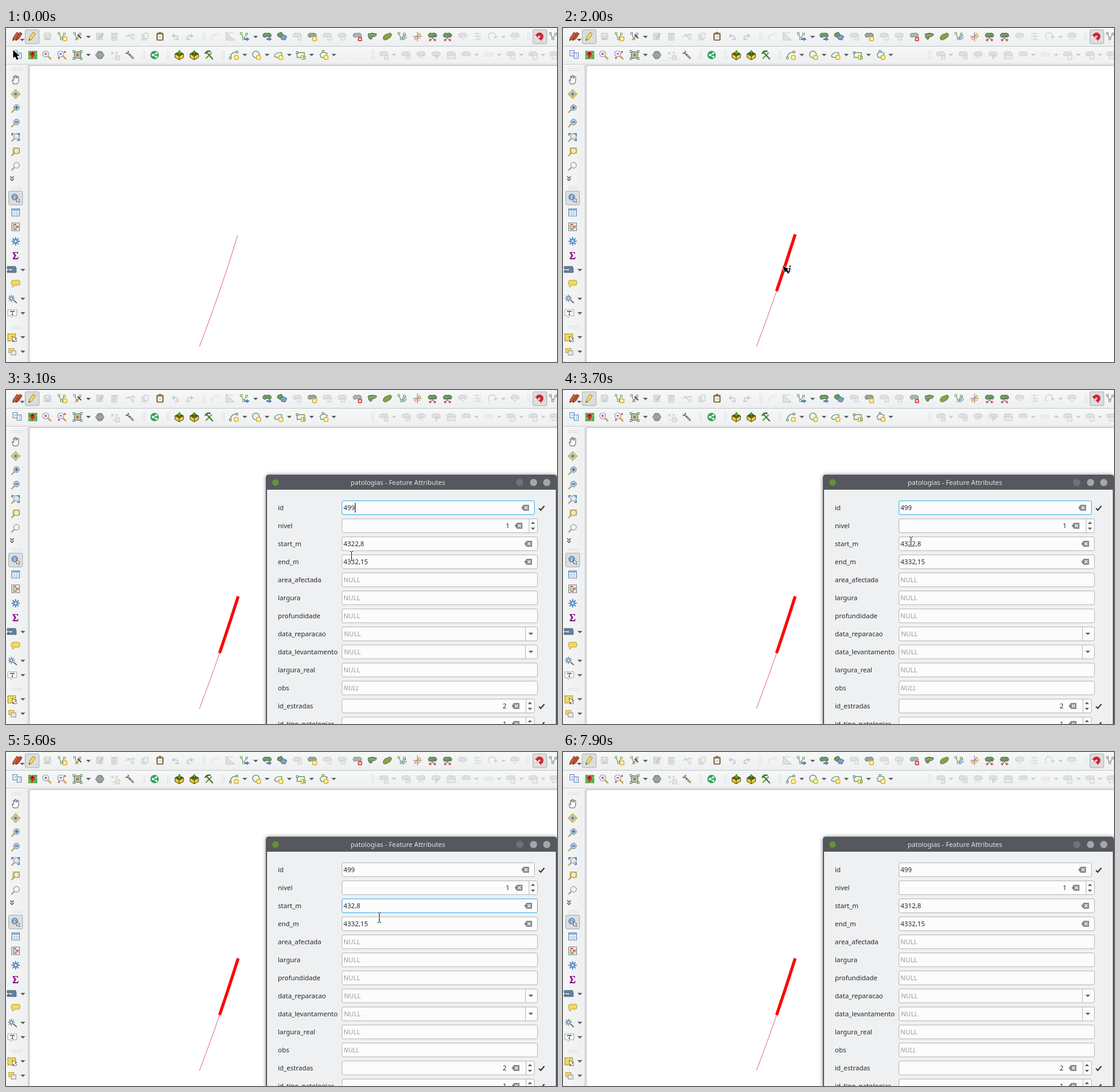
Recreate the animation shown at these times as an HTML page. Size 916 by 556 pixels, loop 8 s.

```html
<!DOCTYPE html>
<html lang="pt">
<head>
<meta charset="utf-8">
<title>Feature attributes</title>
<style>
  html, body { margin: 0; height: 100%; overflow: hidden; background: #fff; }
  svg { display: block; }
  text { font: 11px "Noto Sans", sans-serif; fill: #26292c; white-space: pre; }
  .null { fill: #9a9c9e; }
  .italic { font-style: italic; }
  .shadow { filter: drop-shadow(0 0 3px #0007); }
</style>
</head>
<body>
<svg id="stage" width="916" height="556" viewBox="0 0 916 556"></svg>
<script>
const GREEN = '#6f9c62', DARK = '#46664a', GREY = '#cacccd', PALE = '#dfe0e1',
  BLUE = '#5585b8', YELLOW = '#f4da58', INK = '#4a4e51', RED = '#d8232d';

// Drawing helpers, all returning SVG markup
const path = (d, fill = 'none', stroke = 'none', w = 1) =>
  `<path d="${d}" fill="${fill}" stroke="${stroke}" stroke-width="${w}"/>`;
const line = (d, stroke, w = 1) => path(d, 'none', stroke, w);
const rect = (x, y, w, h, fill, stroke = 'none', r = 0) =>
  `<rect x="${x}" y="${y}" width="${w}" height="${h}" rx="${r}" fill="${fill}" stroke="${stroke}"/>`;
const circle = (x, y, r, fill, stroke = 'none', w = 1) =>
  `<circle cx="${x}" cy="${y}" r="${r}" fill="${fill}" stroke="${stroke}" stroke-width="${w}"/>`;
const text = (x, y, s, attrs = '') => `<text x="${x}" y="${y}" ${attrs}>${s}</text>`;
const at = (x, y, art) => `<g transform="translate(${x} ${y})">${art}</g>`;

const drop = (x, y, c = '#5a5e61') => path(`M${x - 4} ${y - 2}h8l-4 4z`, c);
const dots = d => `<path d="${d}" stroke="#b4b7b9" stroke-dasharray="1 2" fill="none"/>`;
const gripV = (x, y) => dots(`M${x - 1.5} ${y - 7}v15m3-15v15`);
const gripH = y => dots(`M9 ${y - 1.5}h16m-16 3h16`);
const pressed = (x, y) => rect(x - 11.5, y - 11.5, 23, 23, '#dcdddf', '#a9acae', 2);

// Icon parts
const node = (x, y, c = '#5d7f61') => rect(x - 1.5, y - 1.5, 3, 3, '#fff', c);
const star = rect(0.5, 0.5, 7, 7, YELLOW, '#c9ab3a', 1) + line('M4 2v4M2 4h4', '#fff', 1.5);
const arrow = path('M-1 3h4v-2l5 3.5-5 3.5v-2h-4z', BLUE);
const vee = (c = GREEN) => line('M-6-5l4 9 5-8', c, 1.2) + node(-6, -5, c) + node(-2, 4, c) + node(3, -4, c);
const blob = (fill, edge) => path('M-7-3Q-5-7-1-5Q6-7 7-2Q7 2 3 1Q0-1-2 1Q-7 3-7-3z', fill, edge);
const greyBlob = blob(PALE, GREY);
const greenBlob = blob(GREEN, DARK);
const pencil = (fill, edge) => path('M-5 7l1-5 6-9 4 2.500-6 9z', fill, edge) + path('M-5 7l.5-2.500 2 1z', '#333');
const lens = (fill, sign = '') => line('M-2 2l-5 5', '#b39a4c', 2) +
  circle(1.5, -1.5, 4.7, fill, '#737b80') + line(sign, '#2e5d8f', 1.6);
const redLens = extra => line('M2 2l5 5', '#c8a23c', 2.5) + circle(-2, -2, 5, '#f4f8fb', '#7f9fbd', 1.2) + extra;
const gear = c => line('M0-7V7M-7 0H7M-5-5L5 5M5-5L-5 5', c, 2) + circle(0, 0, 4.2, c) + circle(0, 0, 1.8, '#eff3f7');
const sheet = (x, y, fill, edge) => rect(x, y, 7, 9, fill, edge);
const box = path('M-7-2L0-6 7-2V4L0 8-7 4z', '#f0d22f', '#3a3818') + path('M-6-2L0-5 6-2 0 1z', '#4b4a1b') +
  line('M-7-2L0 2 7-2M0 2V8', '#3a3818');
const split = greenBlob + line('M-4 7L4-2M4 7L-2 0', '#4b4e50') + circle(-4, 6, 1.5, 'none', RED) + circle(4, 6, 1.5, 'none', RED);

const row1 = {
  18: at(-2, 0, pencil('#c0623a', '#8a4024')) + at(3, 0, pencil('#b9502d', '#8a4024')) + drop(9, 6),
  69: rect(-5.5, -5.5, 11, 11, PALE, GREY, 1) + rect(-3, -5, 6, 4, '#f2f2f2', GREY) + rect(-3, 2, 6, 3, GREY),
  94: vee() + star,
  120: vee('#84898b') + line('M-5 6L4-3', '#c59636', 1.6) + line('M-1-3l6 6', INK, 2) + drop(17, 1),
  156: rect(-5.5, -5.5, 10, 11, PALE, GREY) + line('M-4-2h7M-4 1h5', GREY) + line('M-1 4l7-9', '#b9bbbc', 2),
  180: rect(-4.5, -3.5, 9, 10, PALE, GREY, 1) + line('M-6-5h12M-2-1v5M1-1v5', GREY, 1.3),
  206: line('M-7 0L6-4M-4-4l8 8', GREY, 1.4) + circle(5, 4, 2, 'none', GREY) + circle(6, -2, 2, 'none', GREY),
  231: sheet(-5, -3, PALE, GREY) + sheet(-1.5, -5.5, '#eee', GREY),
  256: rect(-5.5, -5.5, 11, 12, '#a0805a', '#7f6338', 1) + rect(-3.5, -3, 7, 8, '#fbfbf6') + line('M-2-6h4', '#777', 3) + line('M-2 0h4M-2 2h4', '#b5b5ae'),
  281: line('M-4-1H1Q5-1 5 5H0', GREY, 2) + path('M-6-1l5-4v8z', GREY),
  306: line('M4-1H-1Q-5-1-5 5H0', GREY, 2) + path('M6-1l-5-4v8z', GREY),
  347: line('M-6 6Q-5-5 6-4', PALE, 1.5) + node(6, -4, PALE),
  372: path('M-6-6V6H7z', '#e6e7e7', GREY, 1.4) + line('M-6-6L6-6M-3 0v3h3', GREY),
  397: vee() + arrow + drop(18, 1),
  434: greenBlob + arrow,
  459: path('M-7-5l6-2 3 5-5 4-5-3z', GREEN, DARK) + path('M-3 0l5-3 6 3-3 6-6-1z', '#7ba3c1', '#47718f'),
  484: greyBlob + rect(1, 0, 6, 6, '#eceded', GREY),
  509: blob('#9ba599', '#737d72') + star,
  534: greyBlob + rect(1, 0, 6, 6, '#eceded', GREY),
  559: greyBlob + rect(-2, 1, 6, 5, '#eceded', GREY),
  584: blob('#aeb4b0', '#858c88') + rect(1, 1, 7, 7, '#dc4a50', 'none', 1) + line('M3 3l3 3M6 3l-3 3', '#fff', 1.2),
  609: path('M-7-4Q0-7 7-4Q7 1 1 0Q-1 5-3 5Q-7 3-7-4z', GREEN, DARK) + line('M-6-1Q0-4 6-1', '#d9b744', 1.2),
  634: path('M-7 4Q-7-3 0-4Q7-8 7-2Q5 3 1 4Q-5 8-7 4z', '#85a348', '#5d7531'),
  659: vee() + line('M-1 5l7-8M1 6l6-5', BLUE, 1.2),
  684: line('M-7 0H7M0-8V8', '#777') + line('M-4 6L4-6M-6 3H5', '#e06a58') + node(4, -2, '#dca52e') + node(-2, 3, '#dca52e'),
  709: split, 734: split,
  759: greyBlob + line('M-3 2l6 3', GREY),
  784: line('M-6-5H6M-6 0H6M-6 5H6', PALE, 2) + line('M-2-6l4 12', GREY),
  809: line('M-4 5A6 6 0 1 1 5 1', GREY, 1.3) + path('M2 0h6l-3 4z', GREY) + drop(18, 1, GREY),
  846: greyBlob + line('M-3 4h6', GREY),
  911: vee('#84898b')
};

const shape = (d, dd) => line(d, GREEN, 1.4) + star + drop(dd, 0);
const row2 = {
  18: sheet(-6.5, -7.5, '#f2f6fa', BLUE) + sheet(.5, -3.5, '#f2f6fa', BLUE) + line('M-4-4h3M-4-2h3M3-1h3M3 2h3', '#86a9cf'),
  44: rect(-7, -7, 15, 14, '#5fae4c') + line('M-7 3L8-3M-2-7L3 7', '#a4d394') + path('M0 6L-4-1A4 4 0 1 1 4-1z', RED) + circle(0, -3, 1.4, '#5a0d11'),
  68: redLens(circle(-2, -2, 2, '#dc555c')),
  93: redLens(line('M-4-2h4', RED, 1.6) + circle(5, -5, 1.4, RED) + circle(-5, 5, 1.4, RED)),
  119: rect(-5.5, -5.5, 11, 11, '#a7c99d', '#667f67') + node(-6, -6) + node(6, -6) + node(-6, 6) + node(6, 6) + circle(0, 0, 2.2, '#da5a4a') + drop(18, 0),
  156: path('M-7 0L-3-6H3L7 0 3 6H-3z', '#d3d6d8', '#5e6366') + line('M-7 0H7M-5-3H5M-5 3H5M0-6V6M-2-6Q-5 0-2 6M2-6Q5 0 2 6', '#5e6366', .8),
  181: line('M-6-5l4 4m0-4l-4 4M1-5l2 2 2-2m-2 2v3', GREY, 1.3) + rect(1, 1, 7, 7, '#ebe5cb', GREY) + line('M-5 5H0', GREY),
  206: line('M-2-2L6 6', '#63676a', 3) + line('M-3-7Q-1-2-7-3', '#63676a', 2) + line('M0 0L6 6', '#d7b25a', 1.3),
  247: circle(0, 0, 7, '#35a45a') + line('M3-3L-3 0l6 3', '#fff', 1.2) + circle(3, -3, 1.7, '#fff') + circle(-3, 0, 1.7, '#fff') + circle(3, 3, 1.7, '#fff'),
  288: box + path('M-3-5h2v-3h3v3h2L0 0z', '#55a52f'),
  313: box + path('M-3-4l3-4 3 4H1v4h-2v-4z', '#55a52f', '#2f6420', .7),
  338: line('M-6 6L4-4', '#5fae39', 2.4) + line('M-5-5L6 7', '#4f6a48', 2) + line('M-7-2Q-4-8 2-6', '#3c7433', 2.6),
  379: shape('M-6 5Q-6-5 5-5', 18) + node(-6, 5) + node(5, -5),
  416: shape('M-6-1A5.500 5.500 0 1 1 5-1A5.500 5.500 0 1 1-6-1', 18),
  453: shape('M-7 2Q-5-5 4-4Q8-3 3 2Q-3 6-7 2', 18),
  490: shape('M-6-4H6V4H-6z', 18) + node(-6, -4) + node(6, 4),
  528: shape('M-6-1L-1-6 6-3 3 4-4 4z', 17) + node(-1, -6),
  628: greyBlob + rect(1, 1, 6, 6, '#e8e9e9', GREY) + drop(17, 0, GREY),
  665: greyBlob + rect(0, 1, 7, 5, '#e8e9e9', GREY),
  690: greyBlob + line('M-5 6l10-7M-3 0l7 6', GREY),
  715: greyBlob + line('M0-1v8M3 0v4', GREY, 2),
  740: greyBlob + rect(-6, 0, 13, 6, '#e8e9e9', GREY),
  765: greyBlob + drop(17, 0, GREY),
  802: path('M-7-3H7L6 2H-5z', '#ececec', PALE) + drop(18, 0, GREY),
  839: greyBlob + rect(0, 0, 7, 7, '#eee', GREY) + drop(18, 0, GREY),
  876: greyBlob + rect(0, 0, 7, 7, '#eee', GREY) + drop(17, 0, GREY),
  911: greyBlob + rect(-3, 0, 8, 6, '#eee', GREY)
};

const side = {
  86: path('M-4 7L-6 1-5 0-3 2-4-5-2-6-1-2-1-7 1-7 2-2 3-6 5-5 5 3 3 7z', '#fff', '#55585a'),
  110: path('M0-8l3.500 4h-7zM0 8l3.500-4h-7zM-8 0l4-3.500v7zM8 0l-4-3.500v7z', '#efcf48', '#a08a2c', .7) + rect(-2.5, -2.5, 5, 5, BLUE),
  134: lens('#b4cde4', 'M-1 -1.500h5m-2.500-2.500v5'),
  158: lens('#b4cde4', 'M-1-1.500h5'),
  182: lens('#dfe8f0') + path('M-7-7h5l-5 5zM7-7v5l-5-5zM7 6v-5l-5 5z', BLUE),
  206: rect(-4.5, -6.5, 11, 9, YELLOW, '#c9b35a') + lens('#f7ecb0'),
  230: lens('#f5f6f4'),
  251: line('M-9-4l3 3 3-3m-6 4l3 3 3-3', INK, 1.4),
  283: pressed(0, 0) + circle(-1.5, -1.5, 5, '#7ba2ca', '#5580ab') + line('M-1.500-1.500v3M-1.500-4.500v1.500', '#fff', 1.5) + path('M1 0l6 3-2 1 2 3-1 1-3-3-1 2z', '#fff', '#444', .8),
  307: rect(-6.5, -6, 13, 12, '#f7fafc', BLUE) + rect(-6, -6, 12, 3, '#83abd4') + line('M-6 0H6M-6 3H6M-2-3V6M2-3V6', '#a9c3de'),
  331: rect(-6.5, -6.5, 13, 13, '#f4f4f2', '#7b7f82') + line('M-6-2H6M-6 2H6', '#999') + line('M-4-4h5M0 0h5', '#cc6058', 2) + line('M-4 0h2M-4 4h6', '#6aa765', 2),
  355: gear('#5b92c9'),
  379: path('M-5-6H4V-3H3L2-5H-2L1 0-2 4H3L4 2H5L4 6H-5V5L-2 0-5-5z', '#8b128f'),
  402: path('M-14-1V-5H-2Q1-6 1 0V5H-14V2H-5V-1z', '#6483a3', '#47607a') + line('M-12 0V4', INK) + drop(12, 1),
  426: path('M-4-6H5Q7-6 7-3V0Q7 2 5 2H-1L-5 6V2Q-7 2-7 0V-3Q-7-6-4-6z', YELLOW, '#b89e42'),
  451: at(-7, -1, `<g transform="scale(.85)">${gear('#7f99b1')}</g>`) + line('M-3 2L2 7', INK, 1.5) + drop(12, 0),
  475: path('M-13-6H2V4H-4L-7 7-8 4H-13z', '#fafafa', '#a3a7a9') + path('M-9-4H-2V-2H-3L-4-3H-5V2H-4V3H-7V2H-6V-3H-7L-8-2H-9z', '#444') + drop(12, 0),
  515: `<rect x="-13" y="-6" width="13" height="12" fill="${YELLOW}" stroke="#6b6136" stroke-dasharray="2 1"/>` + path('M-6-2l8 4-3 1 3 3-2 2-3-3-1 3z', '#fff', '#444', .8) + drop(12, 0),
  539: rect(-11.5, -5.5, 9, 7, YELLOW, '#b8a24b') + rect(-7.5, -1.5, 8, 7, '#e4e6e8', '#92989b') + drop(12, 0)
};

const place = (icons, y) => Object.entries(icons).map(([x, art]) => at(x, y, art)).join('');
const magnet = `<g transform="rotate(225)">${line('M-4-5V0A4 4 0 0 0 4 0V-5', RED, 5) + line('M-4-6v2.500M4-6v2.500', '#f4f4f4', 4)}</g>`;

const toolbars = `<defs>
  <linearGradient id="down" x2="0" y2="1"><stop stop-color="#f6f7f7"/><stop offset="1" stop-color="#eeeff0"/></linearGradient>
  <linearGradient id="across"><stop stop-color="#f4f5f5"/><stop offset="1" stop-color="#eeeff0"/></linearGradient></defs>` +
  rect(0, 0, 916, 30, 'url(#down)') + rect(0, 31, 916, 30, 'url(#down)') + rect(0, 62, 37, 494, 'url(#across)') +
  line('M0 30.500H916M0 60.500H916M36.500 62V556', '#c3c6c8') + line('M38.500 556V62.500H916', '#a6a9ab') +
  pressed(43.5, 14.5) + at(43, 14, pencil(YELLOW, '#9a8838')) + place(row1, 14) +
  pressed(887.5, 14.5) + at(887, 14, magnet) + place(row2, 45) +
  [[329, 14], [869, 14], [229, 45], [270, 45], [361, 45], [610, 45]].map(p => gripV(...p)).join('') +
  Object.entries(side).map(([y, art]) => at(16, y, art)).join('') + [69, 266, 498].map(gripH).join('');

// Attribute form
const rows = [
  ['id', '499', 'clear check'], ['nivel', '1', 'spin'], ['start_m', '4322,8', 'clear'], ['end_m', '4332,15', 'clear'],
  ['area_afectada'], ['largura'], ['profundidade'], ['data_reparacao', 'NULL', 'combo'], ['data_levantamento', 'NULL', 'combo'],
  ['largura_real'], ['obs', 'NULL', 'italic'], ['id_estradas', '2', 'spin check'], ['id_tipo_patologias', '1', 'spin check']
];
const clearIcon = (x, y) => at(x, y, path('M-6.500 0l4-5h9v10h-9z', '#85888a') + line('M-1-2.500l5 5m0-5l-5 5', '#fff', 1.3));

function formRow([label, value = 'NULL', kind = ''], i) {
  const y = 196 + 30 * i, has = k => kind.includes(k), right = has('check') ? 878 : 883;
  let out = text(452, y + 4, label) +
    `<g id="field${i}">${rect(558.5, y - 11.5, right - 558, 23, '#fcfcfc', '#b5b8ba', 2.5)}</g>`;
  if (has('spin')) {
    const x = right - 7;
    out += text(right - 46, y + 4, value, 'text-anchor="end"') + clearIcon(right - 31, y) +
      line(`M${right - 13.5} ${y - 11}v22`, '#b5b8ba') + path(`M${x - 3.5} ${y - 3}h7l-3.500-4zM${x - 3.5} ${y + 3}h7l-3.500 4z`, '#606467');
  } else {
    const style = value === 'NULL' ? `class="null ${kind}"` : '';
    out += text(has('combo') ? 562 : 561, y + 4, value, `id="value${i}" ${style}`);
  }
  if (has('combo')) out += line(`M863.500 ${y - 11}v22`, '#b5b8ba') + drop(872.5, y, '#606467');
  if (has('clear')) out += clearIcon(right - 15, y);
  if (has('check')) out += line(`M886 ${y + 1}l3 3 6-7`, '#34383b', 2);
  return out;
}

const dialog = `<path class="shadow" d="M432 560V146q0-5 5-5H911q5 0 5 5V560z" fill="#55585e"/>` +
  rect(434, 166, 480, 390, '#eff0f1') + circle(448, 154, 5.5, '#679034') +
  text(651.5, 158, 'patologias - Feature Attributes', 'text-anchor="middle" style="fill:#e3e4e6"') +
  circle(854, 154, 6, '#6f7277') + circle(877, 154, 6, '#a4a6a9') + circle(899, 154, 6, '#a4a6a9') +
  rows.map(formRow).join('');

const halo = (id, d, extra = '') => `<g id="${id}"><path d="${d}" fill="#000" stroke="#fff" stroke-width="1.5" paint-order="stroke"/>${extra}</g>`;
const pointers = halo('plain', 'M0 0V13L3 10.500 6 16 8.500 15 6.500 9.500 10.500 9z') +
  halo('identify', 'M0 0L10 5 7.500 6.500 11.500 11 9.500 13 5.500 8.500 4 11z', line('M10.500 4h2l-1.500 5h1.500', '#000', 1.6) + circle(12.5, .5, 1.2, '#000')) +
  `<g id="beam">${line('M-3.500-7.500h7M.5-7v15M-2.500 8.500h6', '#fff', 3) + line('M-2.500-7.500h2l1 1 1-1h2M.5-7v15M-2.500 8.500h2l1-1 1 1h2', '#111')}</g>`;

const stage = document.getElementById('stage');
stage.innerHTML = toolbars +
  line('M385 345Q371 393 354 441Q341 479 321.500 530.500', '#e5607f') +
  `<g id="highlight">${line('M386 343.500Q371 391 355 438', '#f00', 5)}</g><g id="dialog">${dialog}<rect id="caret" width="1" height="16"/></g>` +
  `<g id="cursor">${pointers}</g>`;

const $ = id => document.getElementById(id);
const show = (id, on) => $(id).setAttribute('visibility', on ? 'inherit' : 'hidden');

// Pointer track: time, x, y
const track = [
  [0, 12, 37], [200, 22, 10], [300, 45, 35], [500, 170, 210], [700, 305, 390], [800, 334, 409], [900, 346, 379],
  [1000, 354, 395], [1300, 360, 394], [1500, 360, 394], [1600, 365, 396], [2600, 365, 396], [2800, 440, 345],
  [3000, 555, 285], [3100, 574, 276], [3500, 578, 254], [4000, 579, 250], [4200, 579, 250], [4700, 620, 275],
  [6300, 620, 275], [6500, 560, 280], [6600, 560, 280], [6800, 610, 350], [7100, 740, 526], [7200, 760, 590]
];
function pointerAt(t) {
  const i = track.findIndex(k => k[0] > t);
  if (i < 0) return track.at(-1).slice(1);
  const [t0, x0, y0] = track[i - 1], [t1, x1, y1] = track[i], p = (t - t0) / (t1 - t0);
  return [Math.round(x0 + (x1 - x0) * p), Math.round(y0 + (y1 - y0) * p)];
}

// Edits: time, focused row, caret position, start_m value
const edits = [
  [0, 0, 3, '4322,8'], [1925, 0, 3, '4322,8'], [4200, 2, 3, '4322,8'], [5100, 2, 2, '432,8'],
  [5700, 2, 3, '4312,8'], [7900, -1, 0, '4312,8']
];

function render(t) {
  const [x, y] = pointerAt(t), open = t >= 2100;
  $('cursor').setAttribute('transform', `translate(${x} ${y})`);
  const overField = open && x > 558 && x < 884 && y > 184;
  const overMap = y > 62 && x > 38 && !(open && x > 432);
  show('beam', overField);
  show('identify', overMap);
  show('plain', !overField && !overMap);
  show('highlight', t >= 1800);
  show('dialog', open);

  const [since, row, pos, value] = edits.findLast(e => e[0] <= t);
  $('value2').textContent = value;
  for (const i of [0, 2])
    $('field' + i).firstChild.setAttribute('stroke', i === row ? '#3daee9' : '#b5b8ba');
  const lit = open && row >= 0 && Math.floor((t - since) / 475) % 2 === 0;
  $('caret').setAttribute('x', Math.floor(561.2 + 6.29 * pos));
  $('caret').setAttribute('y', 188 + 30 * row);
  show('caret', lit);
}

function tick() {
  render(Math.floor(performance.now() % 8000 / 100) * 100);
  requestAnimationFrame(tick);
}
tick();
</script>
</body>
</html>
```
